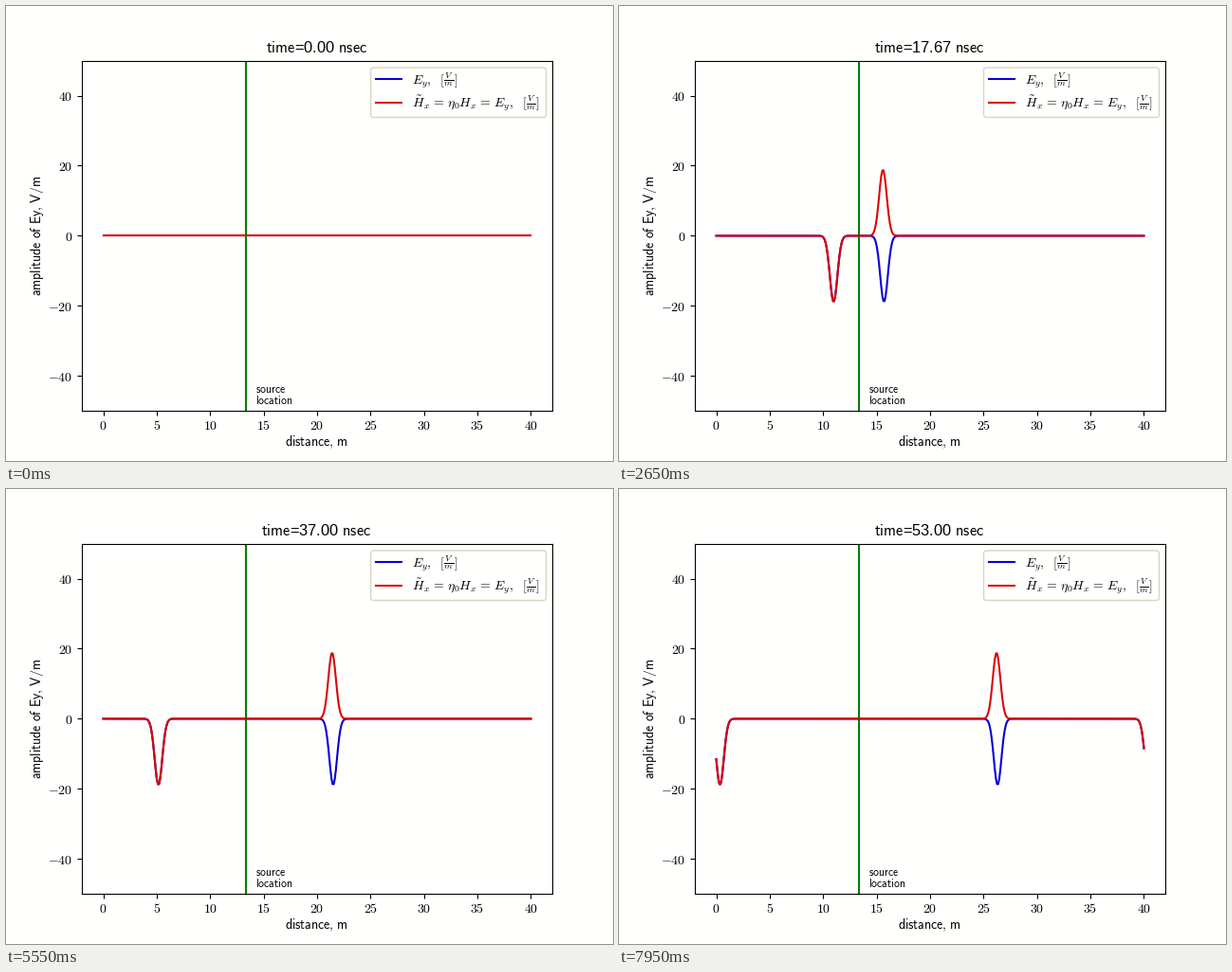
Write a matplotlib script that moves like this. It is 640 px wide and 480 px high and loops after 8 s.

```python
import numpy as np
import matplotlib.pyplot as plt
from matplotlib.animation import FuncAnimation
from matplotlib.lines import Line2D
from matplotlib.patches import FancyBboxPatch

plt.rcParams["mathtext.fontset"] = "cm"

W, H, DPI = 640, 480, 100
FRAMES, INTERVAL = 160, 50
CELLS, SOURCE = 400, 133
STEP_NS = 1 / 3
AMP = 377 / 20
BACK, BLUE, RED = "#fffffd", "#0600d6", "#da0606"

x = np.linspace(0, 40, CELLS)
cell = np.arange(CELLS)
left = (SOURCE - cell) % CELLS     # cells travelled by the left-going wave
right = (cell - SOURCE) % CELLS    # and by the right-going one
goes_left = (left < right) & (left > 0)


def pulse(n):
    return AMP * np.exp(-(n / 5) ** 2)


def fields(n):
    """Electric and scaled magnetic field on the periodic grid at step n."""
    e = -pulse(n - 29.5 - np.minimum(left, right))
    h = np.where(goes_left, e, pulse(n - 30.5 - right))
    return e, h


def sans(text):
    for a, b in ((" ", r"\ "), (",", "{,}"), ("/", "{/}")):
        text = text.replace(a, b)
    return r"$\mathsf{%s}$" % text


fig = plt.figure(figsize=(W / DPI, H / DPI), dpi=DPI, facecolor=BACK)
ax = fig.add_axes([0.125, 0.11, 0.775, 0.77], facecolor=BACK)
ax.set_xlim(-2, 42)
ax.set_ylim(-50, 50)
xt, yt = range(0, 41, 5), range(-40, 41, 20)
ax.set_xticks(xt, [f"${v}$" for v in xt])
ax.set_yticks(yt, [f"${v}$" for v in yt])
ax.tick_params(axis="x", pad=3)


def label(px, py, text, size=10, **kw):
    return fig.text(px / W, 1 - py / H, text, fontsize=size,
                    va="baseline", **kw)


title = label(327.4, 49.3, "", 11.8, ha="center", family="Liberation Sans")
label(327.7, 464, sans("distance, m"), ha="center")
label(36.5, 242.4, sans("amplitude of Ey, V/m"), ha="center",
      rotation=90, rotation_mode="anchor")
label(263.3, 407.5, sans("source"), 8.4)
label(263.3, 419.7, sans("location"), 8.4)

ax.axvline(x[SOURCE], color="green", lw=1.5, zorder=1.5)
e_line, = ax.plot(x, 0 * x, color=BLUE, lw=1.5)
h_line, = ax.plot(x, 0 * x, color=RED, lw=1.5)

# Legend
fig.add_artist(FancyBboxPatch(
    (387.3 / W, 1 - 114.7 / H), 179.4 / W, 46.9 / H,
    boxstyle=f"round,pad={2.8 / W},rounding_size={2.8 / W}",
    mutation_aspect=W / H, transform=fig.transFigure,
    fc=BACK, ec="#d6d6c4", lw=1))
unit = r"{,}\ \,\ [\frac{V}{m}]$"
equals = r"\hspace{0.12}=\hspace{0.12}"
rows = ((76.5, 82.5, BLUE, r"$E_y" + unit),
        (101.7, 107, RED,
         r"$\tilde{H}_x" + equals + r"\eta_0 H_x" + equals + "E_y" + unit))
for y_line, y_text, color, text in rows:
    fig.add_artist(Line2D([389.5 / W, 417.3 / W], [1 - y_line / H] * 2,
                          color=color, lw=1.5, transform=fig.transFigure,
                          solid_capstyle="projecting"))
    label(428.4, y_text, text)


def draw(n):
    e, h = fields(n)
    e_line.set_ydata(e)
    h_line.set_ydata(h)
    title.set_text(f"{sans('time')}={n * STEP_NS:.2f}{sans(' nsec')}")
    return e_line, h_line, title


anim = FuncAnimation(fig, draw, frames=FRAMES, interval=INTERVAL,
                     repeat=True, repeat_delay=0, blit=False)
plt.show()
```
